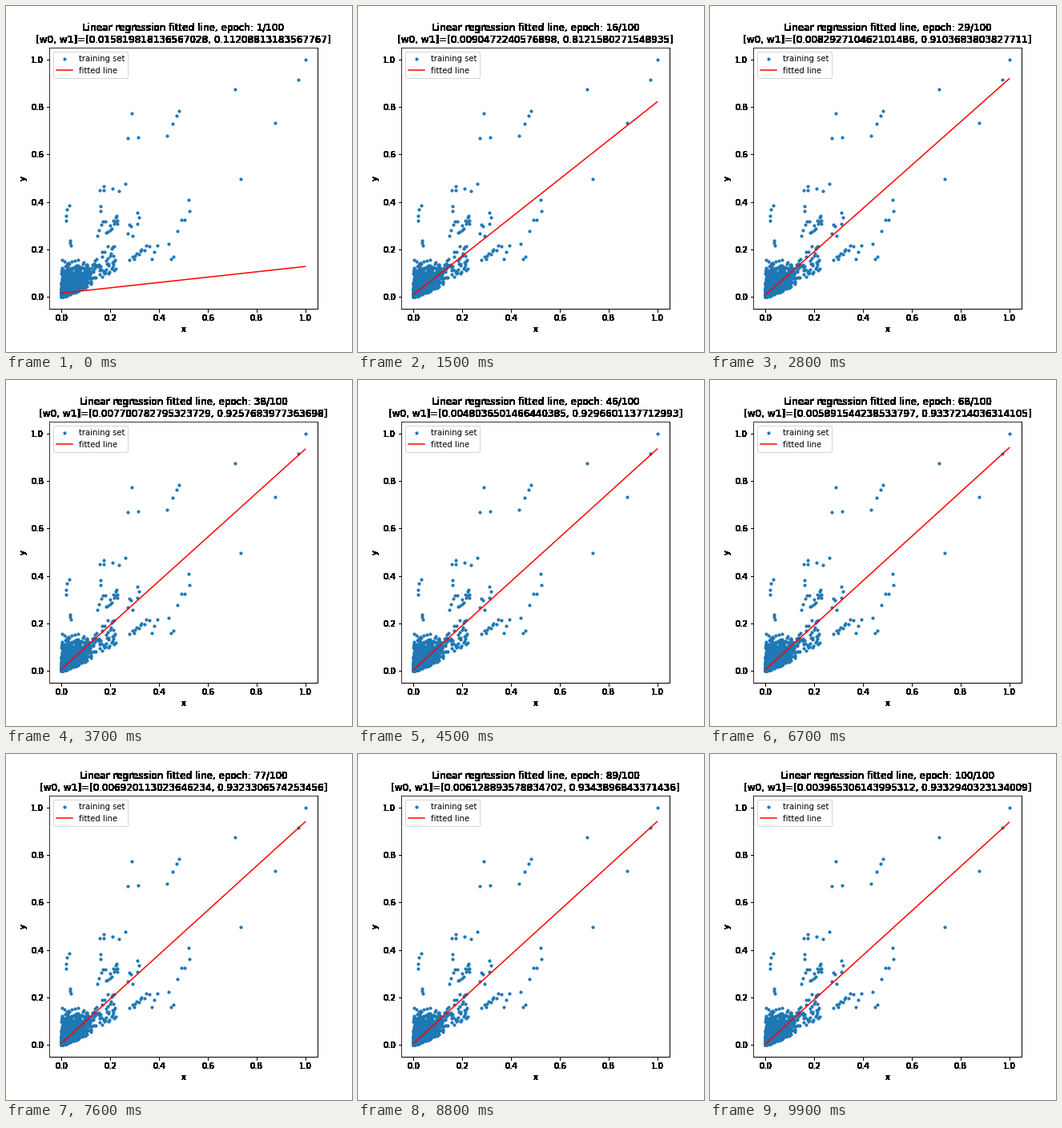
A matplotlib script that plays this animation: 432x432 px, repeating every 10 s.

```python
import numpy as np
import matplotlib.pyplot as plt
from matplotlib.animation import FuncAnimation

EPOCHS = 100
RATE = .1277
START = np.array([0.015819818136567028, 0.11208813183567767])
END = np.array([0.003965306143995312, 0.9332940323134009])

# Isolated samples far from the cloud.
FAR = [(1, 1), (.972, .915), (.877, .733), (.712, .874), (.735, .496),
       (.482, .783), (.472, .763), (.456, .729), (.433, .679), (.288, .773),
       (.272, .668), (.315, .672), (.522, .409), (.525, .362), (.505, .324),
       (.492, .324), (.476, .277), (.440, .223), (.459, .169), (.449, .159)]

rng = np.random.default_rng(7)


def streak(start, end, n, spread=.004):
    """Samples scattered along a short segment."""
    return np.linspace(start, end, n) + rng.normal(0, spread, (n, 2))


def make_points():
    x = rng.exponential(.031, 1700)
    y = x * rng.uniform(.2, 1.15, x.size) + rng.exponential(.024, x.size)
    keep = (x < .12) & (y < .165) & (y > .5 * x - .012)
    cloud = np.column_stack([x, y])[keep]
    x = .08 + .15 * rng.beta(1, 1.4, 85)
    fan = np.column_stack([x, x * rng.uniform(.5, 1.15, x.size)])
    streaks = [
        streak((.032, .383), (.022, .324), 4),
        streak((.147, .455), (.256, .468), 6, .01),
        streak((.150, .270), (.175, .375), 7, .01),
        streak((.190, .270), (.235, .338), 12, .006),
        streak((.270, .260), (.312, .350), 7, .01),
        streak((.280, .155), (.353, .213), 11),
        streak((.371, .160), (.394, .217), 3, .001),
        streak((.035, .235), (.037, .215), 3, .002),
    ]
    return np.vstack([cloud, fan, *streaks, FAR])


def make_weights():
    """Exponential approach to END, with a noisy intercept along the way."""
    decay = np.exp(-RATE * np.arange(EPOCHS))[:, None]
    decay = (decay - decay[-1]) / (1 - decay[-1])
    noise = np.column_stack([rng.uniform(0, .005, EPOCHS),
                             rng.normal(0, .0006, EPOCHS)])
    noise[[0, -1]] = 0
    return (START * decay + END * (1 - decay) + noise).tolist()


def solid(img, dpi):
    """Turn every touched pixel fully black."""
    img[..., :3] = 0
    img[..., 3] = img[..., 3] > 0
    return img, 0, 0


points = make_points()
weights = make_weights()

plt.rcParams["font.family"] = "DejaVu Sans"
fig, ax = plt.subplots(figsize=(6, 6), dpi=72)
fig.subplots_adjust(left=.125, right=.9, bottom=.125, top=.88)
ax.set(xlim=(-.05, 1.05), ylim=(-.05, 1.05), xlabel="x", ylabel="y")
ax.scatter(*points.T, s=10, label="training set")
line, = ax.plot([], [], color="red", label="fitted line")
ax.legend(loc="upper left")
title = ax.set_title("")
for artist in (title, ax.xaxis, ax.yaxis, ax.spines["bottom"], ax.spines["right"]):
    artist.set_agg_filter(solid)


def update(i):
    w0, w1 = weights[i]
    line.set_data([0, 1], [w0, w0 + w1])
    title.set_text(f"Linear regression fitted line, epoch: {i + 1}/{EPOCHS}\n"
                   f"[w0, w1]=[{w0}, {w1}]")
    return line, title


anim = FuncAnimation(fig, update, frames=EPOCHS, init_func=lambda: update(0),
                     interval=100, repeat=True, repeat_delay=0)
plt.show()
```
